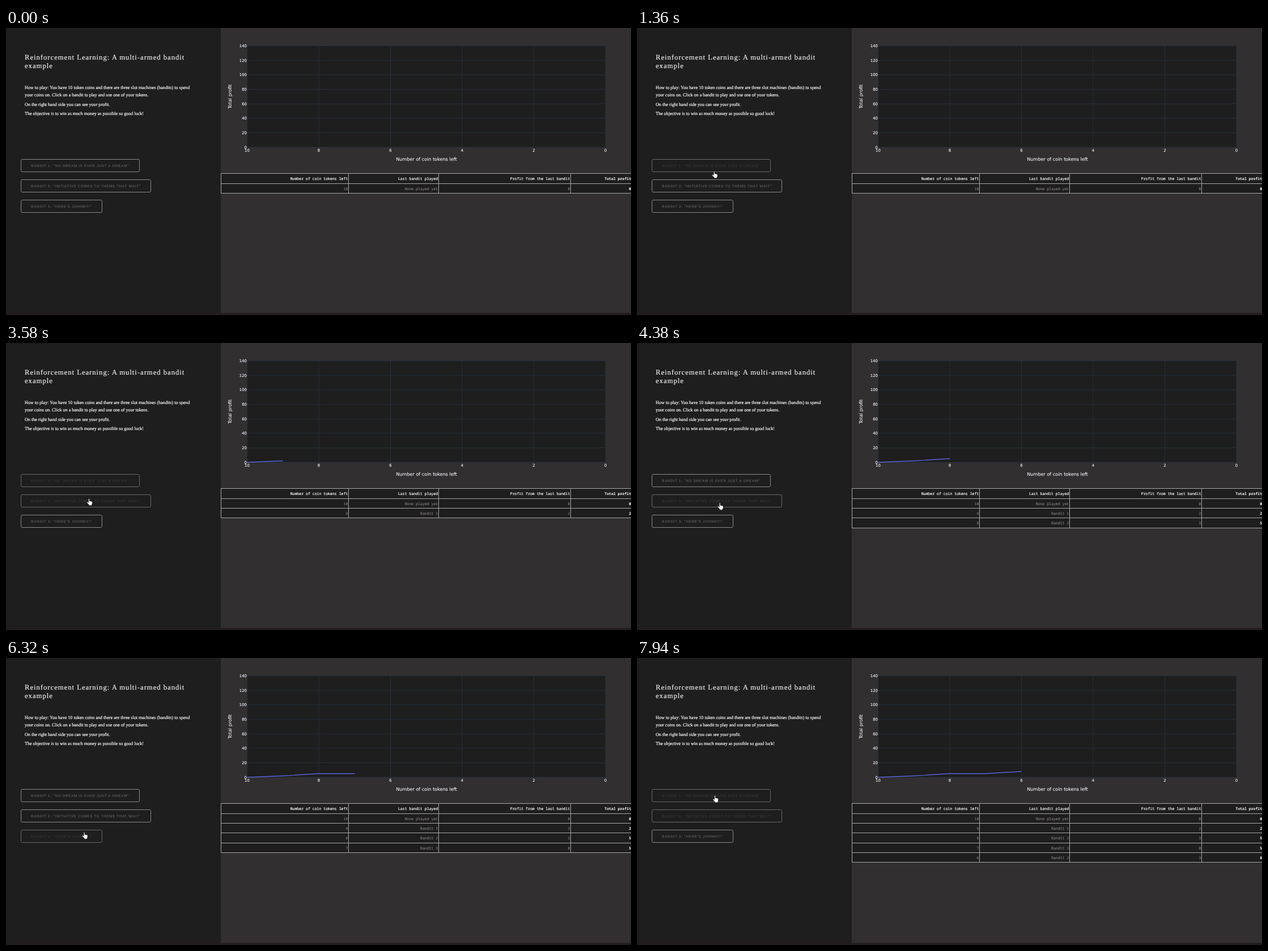
These frames come from a looping animation (1103 px wide and 508 px high, 8 s). An HTML page:

```html
<!DOCTYPE html>
<html lang="en">
<head>
<meta charset="utf-8">
<title>Multi-armed bandit</title>
<style>
  html, body { margin: 0; width: 100%; height: 100%; overflow: hidden; background: #312f30; }
  svg { display: block; width: 1103px; height: 508px; text-rendering: geometricPrecision; }
  .prose { font-family: "Liberation Serif", serif; font-size: 8.08px; fill: #fff; stroke: #fff; stroke-width: .18; }
  .title { font-size: 12.74px; letter-spacing: .95px; fill: #eee; stroke: #eee; }
  .chart { font-family: "DejaVu Sans", sans-serif; font-size: 6.95px; fill: #f2f5fa; }
  .chart text { stroke: #f2f5fa; stroke-width: .12; }
  .axis { font-size: 8.1px; text-anchor: middle; }
  .grid { stroke: #283442; stroke-width: .8; }
  .table { font-family: "Noto Sans Mono", monospace; font-size: 6.53px; text-anchor: end; stroke-width: .18; }
  .cell { fill: #7d7478; stroke: #7d7478; }
  .head { fill: #fff; stroke: #fff; }
  .total { fill: #fff; font-weight: bold; }
  .rule { fill: #a8a8a8; }
  .button { font: bold 6.37px "Liberation Sans", sans-serif; letter-spacing: .579px; }
  .button rect { fill: none; stroke: #8a8a8a; }
  .button text { fill: #555; }
  .button.active rect { stroke: #696969; }
  .button.active text { fill: #333; }
  .pointer { fill: #fff; stroke: #000; stroke-width: 1; stroke-linejoin: round; }
</style>
</head>
<body>
<svg id="stage" viewBox="0 0 1103 508">
  <rect width="1103" height="508" fill="#312f30"/>
  <rect width="379" height="508" fill="#1e1e1e"/>
  <rect y="504.5" width="1103" height="3.5" fill="#241c1f"/>
  <g class="prose">
    <g class="title">
      <text x="33" y="56">Reinforcement Learning: A multi-armed bandit</text>
      <text x="33" y="71.3">example</text>
    </g>
    <text x="33" y="107.6">How to play: You have 10 token coins and there are three slot machines (bandits) to spend</text>
    <text x="33" y="120.5">your coins on. Click on a bandit to play and use one of your tokens.</text>
    <text x="33" y="137.5">On the right hand side you can see your profit.</text>
    <text x="33" y="154.4">The objective is to win as much money as possible so good luck!</text>
  </g>
  <g id="chart" class="chart">
    <rect x="425.5" y="31.5" width="632.5" height="179.5" fill="#1e1e1e"/>
    <text class="axis" x="742" y="235">Number of coin tokens left</text>
    <text class="axis" transform="translate(397.8 121.3) rotate(-90)">Total profit</text>
  </g>
  <polyline id="line" fill="none" stroke="#636efa" stroke-width="1.2" stroke-linejoin="round"/>
  <g id="table" class="table"></g>
  <g id="buttons"></g>
  <circle id="click" r="7" fill="#ff0" fill-opacity=".47"/>
  <g id="cursor" class="pointer">
    <path id="arrow" transform="scale(.6)" d="M0 0V16.5L3.8 12.9 6.3 18.8 8.7 17.8 6.2 12H11.5Z"/>
    <path id="hand" transform="scale(.6) translate(-6.3 0)" d="M5 13V2.2Q5 .6 6.5 .6T8 2.2V8Q9.5 6.9 11 8.6Q12.7 7.7 13.7 9.3Q16.4 8.7 16.4 11.4V15Q16.4 17.5 14.6 19.4V21.5H6.6V19.6L1.1 13.6Q-.3 11 1.2 10.3Q2.6 9.7 5 13Z"/>
  </g>
</svg>
<script>
const LOOP = 8000;
const byId = id => document.getElementById(id);

function add(parent, tag, attrs, text) {
  const node = document.createElementNS("http://www.w3.org/2000/svg", tag);
  for (const key in attrs) node.setAttribute(key, attrs[key]);
  if (text !== undefined) node.textContent = text;
  return parent.appendChild(node);
}
const show = (node, on) => node.setAttribute("visibility", on ? "visible" : "hidden");

// Chart
const chart = byId("chart");
const chartX = tokens => 425.5 + (10 - tokens) * 63.25;
const chartY = profit => 211.1 - profit * 179.6 / 140;
for (let v = 10; v >= 0; v -= 2) {
  const x = chartX(v);
  add(chart, "path", { class: "grid", d: `M${x} 31.5V211` });
  add(chart, "text", { x, y: 218.6, "text-anchor": "middle" }, v);
}
for (let v = 0; v <= 140; v += 20) {
  const y = chartY(v);
  add(chart, "path", { class: "grid", d: `M425.5 ${y}H1058` });
  add(chart, "text", { x: 425, y: y + 2.6, "text-anchor": "end" }, v);
}

// Table: each play has the time its row appears and the time its line appears
const plays = [
  { row: 0, line: 0, bandit: "None played yet", win: 0 },
  { row: 2700, line: 2900, bandit: "Bandit 1", win: 2 },
  { row: 4380, line: 4380, bandit: "Bandit 2", win: 3 },
  { row: 5720, line: 5720, bandit: "Bandit 3", win: 0 },
  { row: 7000, line: 7000, bandit: "Bandit 2", win: 3 }
];
const columns = [379, 604, 763, 996, 1103];
const rowTop = i => Math.floor(257.9 + 17.3 * i);

function addRow(index, cells, style) {
  const group = add(byId("table"), "g", {});
  const top = rowTop(index), bottom = rowTop(index + 1);
  add(group, "rect", { x: 379, y: top, width: 724, height: bottom - top, fill: "#1e1e1e" });
  for (const y of [top, bottom]) add(group, "rect", { class: "rule", x: 379, y, width: 724, height: 1 });
  for (const x of columns.slice(0, 4)) add(group, "rect", { class: "rule", x, y: top, width: 1, height: bottom - top });
  cells.forEach((text, i) => add(group, "text", {
    class: i === 3 ? "total" : style, x: columns[i + 1] - (i < 3 ? .7 : -.2), y: top + 11.6
  }, text));
  return group;
}

addRow(0, ["Number of coin tokens left", "Last bandit played", "Profit from the last bandit", "Total profit"], "head");
let sum = 0;
plays.forEach((play, i) => {
  sum += play.win;
  play.point = `${chartX(10 - i)},${chartY(sum)}`;
  play.group = addRow(i + 1, [10 - i, play.bandit, play.win, sum], "cell");
});

// Buttons
const buttons = [
  { y: 232.5, width: 209, label: 'BANDIT 1: "NO DREAM IS EVER JUST A DREAM"' },
  { y: 268.5, width: 229, label: 'BANDIT 2: "INITIATIVE COMES TO THEMS THAT WAIT"' },
  { y: 304.5, width: 143, label: 'BANDIT 3: "HERE\'S JOHNNY!"' }
];
for (const b of buttons) {
  b.node = add(byId("buttons"), "g", {});
  add(b.node, "rect", { x: 26.5, y: b.y, width: b.width, height: 22, rx: 2.3 });
  add(b.node, "text", { x: 44, y: b.y + 13.8 }, b.label);
}

// Pointer: moves in discrete steps between start and end, beginning off stage
const easeOut = p => 1 - (1 - p) ** 2;
const easeInOut = p => p * p * (3 - 2 * p);
const origin = { x: 972, y: 528 };
const moves = [
  { start: 610, end: 1360, steps: 11, x: 136, y: 253, ease: easeOut },
  { start: 2900, end: 3170, steps: 5, x: 147, y: 252, ease: easeOut },
  { start: 3440, end: 3780, steps: 6, x: 146, y: 282.5, ease: easeOut },
  { start: 5110, end: 5250, steps: 3, x: 138, y: 315.5, ease: easeOut },
  { start: 6320, end: 6460, steps: 3, x: 138, y: 285, ease: easeInOut },
  { start: 7530, end: 7940, steps: 7, x: 137.5, y: 243, ease: easeOut }
];
const clicks = [
  { start: 2300, end: 2430, button: 0 },
  { start: 3980, end: 4120, button: 1 },
  { start: 5460, end: 5590, button: 2 },
  { start: 6660, end: 6800, button: 1 }
];

function pointerAt(t) {
  let at = origin;
  for (const m of moves) {
    if (t < m.start) break;
    const gap = (m.end - m.start) / (m.steps - 1);
    const step = Math.min(m.steps, 1 + Math.floor((t - m.start) / gap + .001));
    const k = m.ease(step / m.steps);
    at = { x: at.x + (m.x - at.x) * k, y: at.y + (m.y - at.y) * k };
  }
  return at;
}

function draw(t) {
  for (const play of plays) show(play.group, t >= play.row);
  byId("line").setAttribute("points", plays.filter(p => t >= p.line).map(p => p.point).join(" "));

  const { x, y } = pointerAt(t);
  const hovered = buttons.findIndex(b => x >= 26 && x <= 27 + b.width && y >= b.y && y <= b.y + 22);
  const last = clicks.filter(c => t >= c.start).pop();
  buttons.forEach((b, i) => {
    const active = i === hovered || (last && last.button === i);
    b.node.setAttribute("class", active ? "button active" : "button");
  });

  const place = `translate(${x} ${y})`;
  byId("cursor").setAttribute("transform", place);
  byId("click").setAttribute("transform", place);
  show(byId("click"), last && t < last.end);
  show(byId("hand"), hovered >= 0);
  show(byId("arrow"), hovered < 0);
}

const begin = performance.now();
function tick() {
  draw((performance.now() - begin) % LOOP);
  requestAnimationFrame(tick);
}
tick();
</script>
</body>
</html>
```
